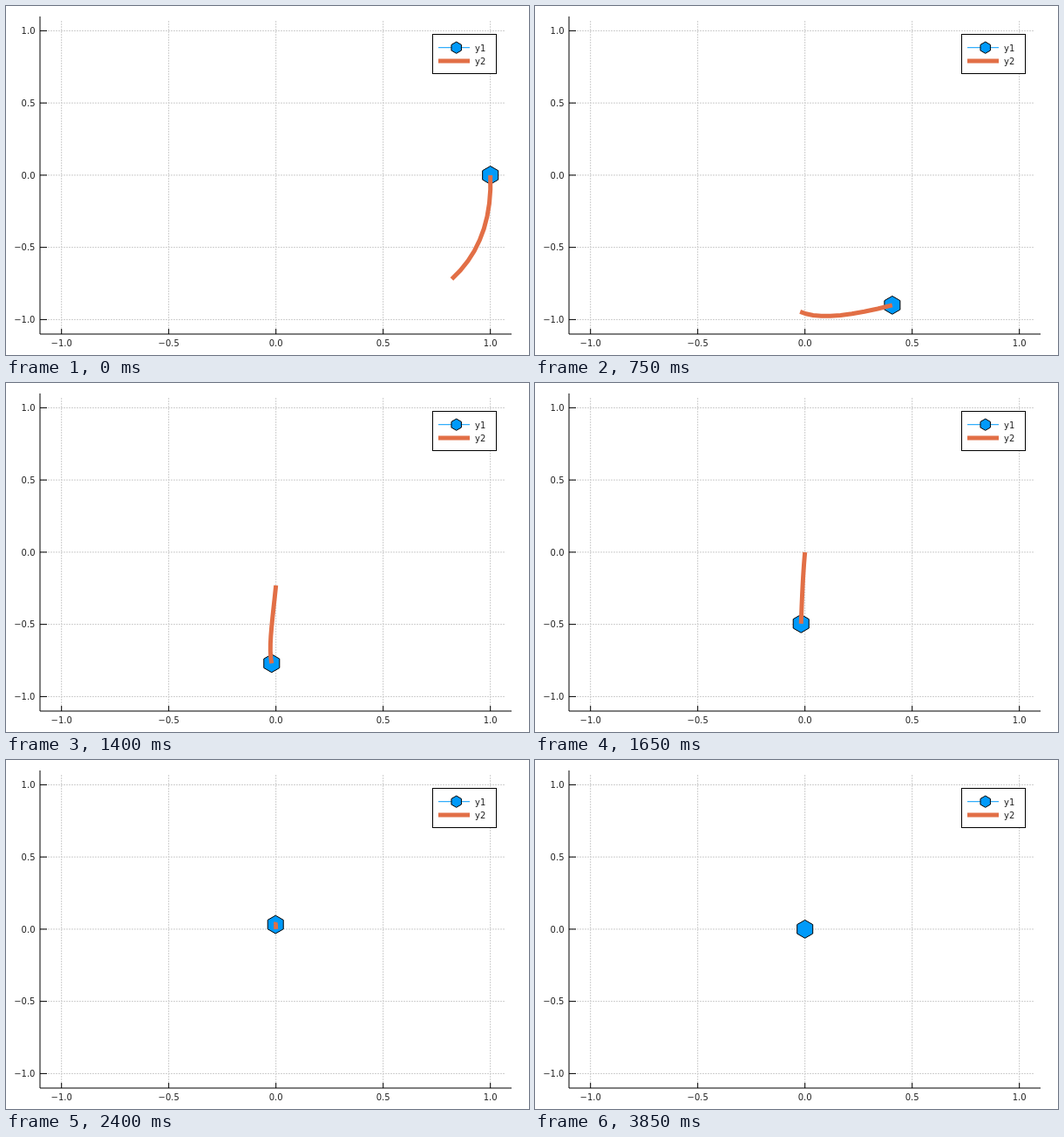
These frames come from a looping animation (600x400 px, 4000 ms). An HTML page:

```html
<!DOCTYPE html>
<html lang="en">
<head>
<meta charset="utf-8">
<title>Receding horizon control</title>
<style>
  html, body { margin: 0; width: 100%; height: 100%; overflow: hidden; background: #fff; }
  svg { display: block; }
  text { font: 10px "DejaVu Sans", sans-serif; fill: #222; }
  .grid { stroke: #ccc; stroke-dasharray: 2 1; }
  .axis { stroke: #000; fill: none; }
  .hex { fill: #009afa; stroke: #000; }
  .trail { stroke: #e26f46; stroke-width: 5; fill: none; stroke-miterlimit: 10; }
</style>
</head>
<body>
<svg width="600" height="400" viewBox="0 0 600 400">
  <g id="plot"></g>
  <path class="axis" d="M39 12V376H580"/>
  <path id="marker" class="hex"/>
  <path id="trail" class="trail"/>
  <rect x="489.5" y="32.5" width="73" height="45" fill="#fff" stroke="#000"/>
  <path d="M496 47.7H532" stroke="#009afa"/>
  <path id="key" class="hex"/>
  <path class="trail" d="M496 63H532"/>
  <text x="538" y="51.5">y1</text>
  <text x="538" y="66.8">y2</text>
</svg>
<script>
const STEP_MS = 50, LOOP_MS = 4000, LAST_STEP = 77;
const HORIZON = 9;
const ACCEL = 0.005; // largest velocity change per step
const byId = id => document.getElementById(id);
const clip = u => Math.max(-1, Math.min(1, u));
const toX = x => 309.7 + 246 * x;
const toY = y => 193.9 - 165.5 * y;

function hexagon(cx, cy, r) {
  const points = Array.from({ length: 6 }, (_, i) => {
    const a = Math.PI * (i / 3 - 0.5);
    return (cx + r * Math.cos(a)).toFixed(2) + " " + (cy + r * Math.sin(a)).toFixed(2);
  });
  return "M" + points.join("L") + "Z";
}

// Bounded push that brings one axis to zero within the steps left:
// brake as late as possible when far, least effort when near.
function control(p, v, left) {
  const w = left - 1;
  if (w < 1) return 0;
  const need = -(p + left * v) / ACCEL;
  if (Math.abs(p) > 0.1) {
    const side = Math.sign(p);
    return side * clip((side * need - w * (w - 1) / 2 + 0.6) / w);
  }
  return clip(1.06 * need * 6 / ((w + 1) * (2 * w + 1)));
}

function simulate(p, v) {
  const states = [];
  for (let n = 0; n <= LAST_STEP; n++) {
    states.push({ p, v });
    v += ACCEL * control(p, v, HORIZON);
    p += v;
  }
  return states;
}

function predict({ p, v }) {
  const path = [p];
  for (let left = HORIZON; left > 0; left--) {
    const u = control(p, v, left);
    p += v;
    v += ACCEL * u;
    path.push(p);
  }
  return path;
}

function drawAxes() {
  let out = "";
  for (const value of [-1, -0.5, 0, 0.5, 1]) {
    const x = toX(value), y = toY(value);
    const label = value.toFixed(1).replace("-", "\u2212");
    out += `<path class="grid" d="M${x} 17V376M39 ${y}H572"/>
      <path class="axis" d="M${x} 376v-6M39 ${y}h8"/>
      <text x="${x}" y="389.7" text-anchor="middle">${label}</text>
      <text x="33.5" y="${y + 3.8}" text-anchor="end">${label}</text>`;
  }
  byId("plot").innerHTML = out;
}

const xs = simulate(1, 0), ys = simulate(0, -0.1);
let shown = -1;

function draw(now) {
  const step = Math.min(LAST_STEP, Math.floor(now % LOOP_MS / STEP_MS));
  if (step !== shown) {
    shown = step;
    const px = predict(xs[step]).map(toX), py = predict(ys[step]).map(toY);
    const reach = Math.hypot(px[HORIZON] - px[0], py[HORIZON] - py[0]);
    const points = px.map((x, i) => x.toFixed(2) + " " + py[i].toFixed(2));
    byId("marker").setAttribute("d", hexagon(px[0], py[0], 10.4));
    byId("trail").setAttribute("d", reach < 0.6 ? "" : "M" + points.join("L"));
  }
}

drawAxes();
byId("key").setAttribute("d", hexagon(516.7, 47.7, 6.6));
const start = performance.now();
function tick() {
  draw(performance.now() - start);
  requestAnimationFrame(tick);
}
tick();
</script>
</body>
</html>
```
